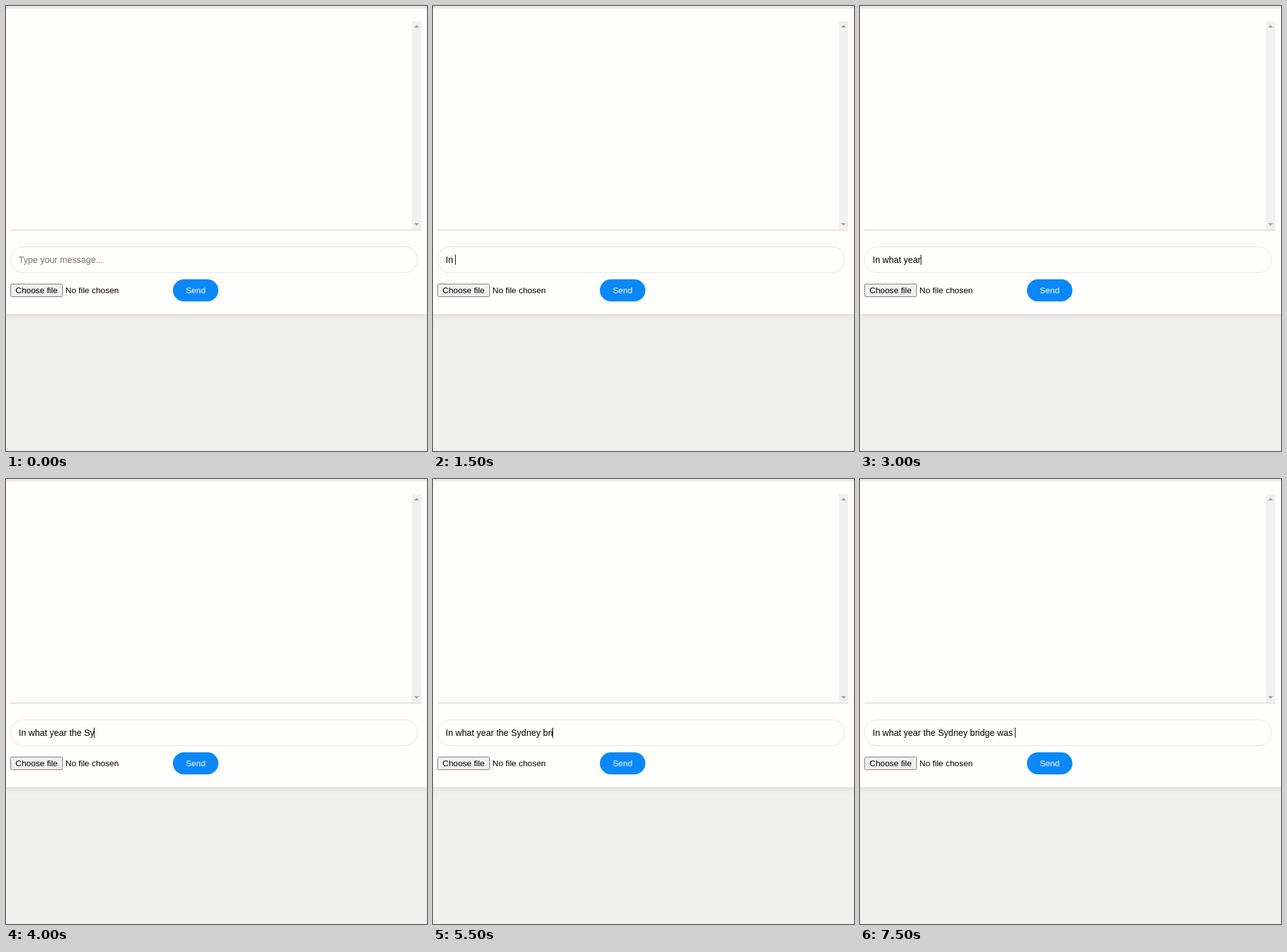
Recreate the animation shown at these times as an HTML page. Size 666x705 px, loop 8 s.

```html
<!DOCTYPE html>
<html lang="en">
<head>
<meta charset="utf-8">
<title>Chat input</title>
<style>
  html, body { margin: 0; width: 100%; height: 100%; overflow: hidden; background: #f0f0ee; }
  #stage { position: relative; width: 666px; height: 705px; overflow: hidden; }
  #card {
    position: absolute; left: -30px; top: 4px; width: 726px; height: 484px;
    background: #fffefd; box-shadow: 0 2px 10px rgba(0, 0, 0, .1);
  }
  svg { position: absolute; left: 0; top: 0; display: block; }
  text { font: 13.3333px "Liberation Sans", Arial, sans-serif; }
  #message { font-size: 14px; }
</style>
</head>
<body>
<div id="stage">
  <div id="card"></div>
  <svg width="666" height="705" viewBox="0 0 666 705">
    <!-- message list -->
    <rect x="7" y="354" width="650" height="2" fill="#e3e3e2"/>
    <rect x="642" y="24" width="15" height="330" fill="#f1f0f1"/>
    <path d="M645.5 34 L649.5 30 L653.5 34Z M645.5 344 L649.5 348 L653.5 344Z" fill="#a0a0a0"/>

    <!-- message field -->
    <rect x="7.5" y="381.5" width="643" height="41" rx="19.5" fill="none" stroke="#e3e3e2"/>
    <text id="message" x="20" y="407"></text>
    <rect id="caret" y="394" width="1" height="16"/>

    <!-- file picker and send button -->
    <rect x="7.5" y="440.5" width="82" height="20" rx="2" fill="#efefef" stroke="#767676"/>
    <text x="15" y="455">Choose file</text>
    <text x="94" y="455">No file chosen</text>
    <rect x="264" y="433" width="72" height="35" rx="17.5" fill="#0a88f8"/>
    <text x="300" y="455" text-anchor="middle" fill="#fffefd">Send</text>
  </svg>
</div>
<script>
  const STEP = 500;
  const LOOP = 8000;
  const LEFT = 20;
  const sentence = "In what year the Sydney bridge was ";
  // Characters typed after each step
  const typed = [0, 0, 0, 3, 6, 7, 12, 17, 19, 23, 25, 27, 29, 31, 33, 35];
  const message = document.getElementById("message");
  const caret = document.getElementById("caret");
  let shown = -1;

  function draw(time) {
    const step = Math.floor((time % LOOP) / STEP);
    if (step === shown) return;
    shown = step;

    const count = typed[step];
    const text = sentence.slice(0, count).replace(/ /g, "\u00a0");
    message.textContent = text || "Type your message...";
    message.setAttribute("fill", count ? "#000" : "#757575");

    const width = count ? message.getComputedTextLength() : 0;
    caret.setAttribute("x", LEFT + Math.floor(width));
    caret.setAttribute("visibility", count || step === 1 ? "visible" : "hidden");
  }

  const start = performance.now();
  function tick() {
    draw(performance.now() - start);
    requestAnimationFrame(tick);
  }
  tick();
</script>
</body>
</html>
```
